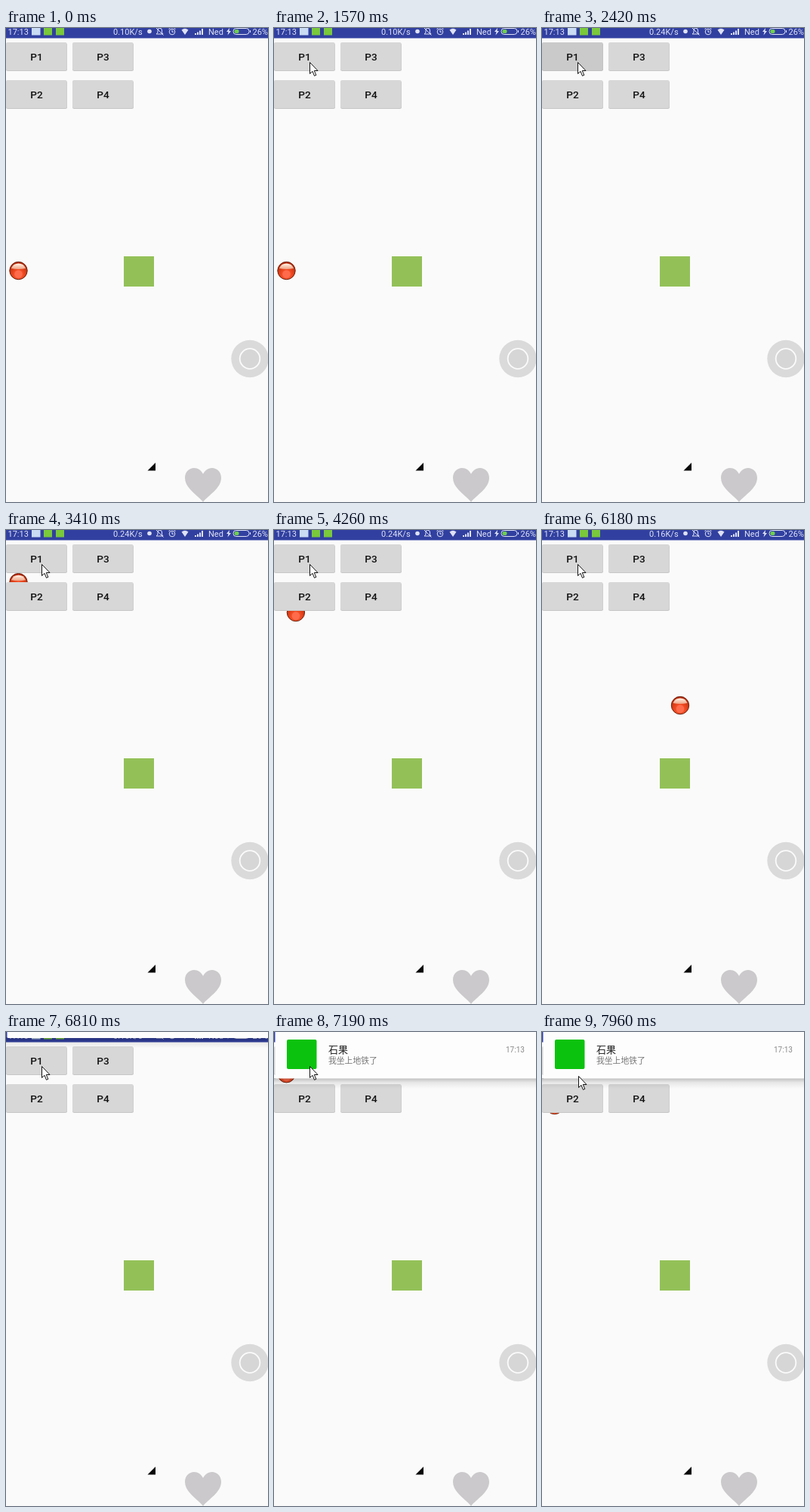
Write an HTML page that moves like this. It is 347 px wide and 627 px high and loops after 8 s.

```html
<!DOCTYPE html>
<html lang="en">
<head>
<meta charset="utf-8">
<title>Path animation demo</title>
<style>
  html, body { margin: 0; width: 100%; height: 100%; overflow: hidden; background: #fafafa; }
  svg { display: block; width: 347px; height: 627px; }
  text { font-family: Roboto, sans-serif; }
  .bar text { font-size: 11px; fill: #dfe2f4; }
  .label { font-size: 13.6px; font-weight: 500; fill: #111; text-anchor: middle; }
  .cjk { font-family: "Noto Sans CJK SC", "Noto Sans CJK", sans-serif; }
</style>
</head>
<body>
<svg viewBox="0 0 347 627">
  <defs>
    <radialGradient id="red" cx=".5" cy=".72" r=".65">
      <stop offset="0" stop-color="#ff6a45"/>
      <stop offset=".45" stop-color="#f04a22"/>
      <stop offset="1" stop-color="#b92c0c"/>
    </radialGradient>
    <linearGradient id="gloss" x1="0" y1="0" x2="0" y2="1">
      <stop offset="0" stop-color="#fff6ea"/>
      <stop offset="1" stop-color="#f0a283"/>
    </linearGradient>
    <linearGradient id="shade" x1="0" y1="0" x2="0" y2="1">
      <stop offset="0" stop-color="#000" stop-opacity=".24"/>
      <stop offset=".4" stop-color="#000" stop-opacity=".08"/>
      <stop offset="1" stop-color="#000" stop-opacity="0"/>
    </linearGradient>
    <clipPath id="p1"><rect y="19" width="81" height="37.5" rx="2"/></clipPath>
  </defs>

  <rect width="347" height="627" fill="#fafafa"/>
  <rect x="156" y="302" width="40" height="40" fill="#93c158"/>
  <circle cx="323" cy="437.5" r="24.7" fill="#dadada"/>
  <circle cx="323" cy="437.5" r="13.3" fill="#d6d6d6" stroke="#fbfbfb" stroke-width="1.8"/>
  <path d="M198 575V585.5H187.5Z" fill="#080808"/>
  <path d="M261 627C254 618 237 609 237 595C237 587 243 582 249 582C255 582 259 586 261 590C263 586 267 582 273 582C279 582 285 587 285 595C285 609 268 618 261 627Z" fill="#cbc9cb"/>

  <g id="ball">
    <circle r="11.7" fill="url(#red)" stroke="#6d2410" stroke-width="1"/>
    <circle cy="4.5" r="5.2" fill="#ff6b4b"/>
    <path d="M-9.5 -3A10.2 10.2 0 0 1 9.5 -3Q0 -1 -9.5 -3Z" fill="url(#gloss)"/>
  </g>

  <g id="buttons"></g>
  <circle id="ripple" cx="48" cy="45" clip-path="url(#p1)" fill="#000"/>

  <g class="bar">
    <rect width="347" height="13.5" fill="#3140a0"/>
    <text x="2.5" y="8.5">17:13</text>
    <rect x="34" y="0" width="11.5" height="9.5" fill="#c9dcf3"/>
    <rect x="50" y="0" width="11" height="9.5" fill="#7ac83c"/>
    <rect x="66" y="0" width="11" height="9.5" fill="#7ac83c"/>
    <text id="speed" x="142" y="8.5"></text>
    <circle cx="190" cy="4.5" r="2.8" fill="#dfe2f4"/>
    <g fill="none" stroke="#dfe2f4">
      <path d="M199 8H208L206.5 6V3A2.7 2.7 0 0 0 201 3V6ZM199 0L208.500 9.500"/>
      <circle cx="220" cy="5" r="3.800"/>
      <path d="M220 2.500V5.200H222M215.500 1.500L217.500 0M224.500 1.500L222.500 0"/>
      <rect x="301" y=".5" width="21" height="8" rx="3.800"/>
      <path d="M323.500 3V6"/>
    </g>
    <g fill="#dfe2f4">
      <path d="M232.500 2.500Q237 -1 241.500 2.500L237 9Z"/>
      <path d="M250 9V7H252V9ZM253 9V5.500H255V9ZM256 9V3.500H258V9ZM259 9V1H261V9Z"/>
      <path d="M296 0L292 5H294.500L293.500 9.500L298 4H295.500Z"/>
    </g>
    <rect x="302.500" y="2" width="6" height="5" rx="2" fill="#6fd04c"/>
    <text x="268" y="8.500">Ned</text>
    <text x="326.500" y="8.500">26%</text>
  </g>

  <g id="card">
    <rect x="0" y="61" width="347" height="14" fill="url(#shade)"/>
    <rect x="1.500" y="-20" width="346" height="81.500" rx="1.500" fill="#fdfdfd"/>
    <rect x="17" y="10" width="39.500" height="39" rx="2" fill="#0bc30e"/>
    <text class="cjk" x="72" y="28" font-size="13" fill="#222">石果</text>
    <text class="cjk" x="72" y="41.500" font-size="10.800" fill="#777">我坐上地铁了</text>
    <text x="307" y="27" font-size="10" fill="#8a8a8a">17:13</text>
  </g>

  <path id="cursor" d="M.5 .5V15.500L4 12.300L6.500 18.300L8.800 17.300L6.300 11.500H11Z" fill="#fff" stroke="#111" stroke-width="1"/>
</svg>
<script>
const LOOP = 8000, START = 500, STEP = 76.9, REPEAT = 4160;
const $ = id => document.getElementById(id);

$('buttons').innerHTML = [['P1', 0, 19], ['P2', 0, 69], ['P3', 88, 19], ['P4', 88, 69]].map(([name, x, y]) =>
  `<rect x="${x}" y="${y + .7}" width="81" height="37.300" rx="2.500" fill="#c6c6c6"/>
   <rect x="${x}" y="${y}" width="80.500" height="37" rx="2" fill="#d7d7d7"/>
   <text class="label" x="${x + 40.500}" y="${y + 24}">${name}</text>`).join('');

// Rows of [time, x, y]
const ballPath = [
  [2030, 16.5, 38], [2800, 16.5, 45], [3410, 16.5, 72], [3568, 16.5, 82], [3720, 16.5, 94.5],
  [3800, 16.7, 97], [4030, 20.5, 102], [4260, 32.5, 112], [4490, 58.5, 135.5], [4650, 81, 167],
  [4800, 104, 207], [4950, 125, 239], [5110, 148.5, 252], [5190, 172, 243], [5267, 183, 232]
];
const cursorPath = [
  [500, 296, 505], [650, 236, 385], [800, 151, 232], [950, 82, 105], [1110, 47, 45],
  [7810, 47, 45], [7959, 48, 58]
];
const cardPath = [[6730, 0, -80], [6805, 0, -54], [6882, 0, -14], [6958, 0, 0]];

function at(path, t) {
  const i = path.findIndex(p => p[0] > t);
  if (i < 0) return path[path.length - 1].slice(1);
  if (i === 0) return path[0].slice(1);
  const [t0, x0, y0] = path[i - 1], [t1, x1, y1] = path[i];
  const k = (t - t0) / (t1 - t0);
  return [x0 + (x1 - x0) * k, y0 + (y1 - y0) * k];
}

function move(el, [x, y]) {
  el.setAttribute('transform', `translate(${x.toFixed(2)} ${y.toFixed(2)})`);
}

function press(t) {
  const age = t - (t < 6180 ? 1880 : 6180);
  const on = age >= 0 && age < 610;
  $('ripple').setAttribute('r', on ? 14 + age * .2 : 0);
  $('ripple').setAttribute('opacity', on ? .13 * Math.min(1, (610 - age) / 300) : 0);
}

function draw(t) {
  if (t >= START) t = START + STEP * Math.floor((t - START) / STEP + 1e-6);
  const second = t >= 2030 + REPEAT;
  move($('ball'), t < 2030 ? [16.5, 321] : at(ballPath, second ? t - REPEAT : t));
  move($('cursor'), at(cursorPath, t));
  $('cursor').setAttribute('visibility', t < START ? 'hidden' : 'visible');
  move($('card'), at(cardPath, t));
  $('speed').textContent = t < 1565 ? '0.10K/s' : t < 5480 ? '0.24K/s' : '0.16K/s';
  press(t);
}

function tick() {
  draw(performance.now() % LOOP);
  requestAnimationFrame(tick);
}
tick();
</script>
</body>
</html>
```
